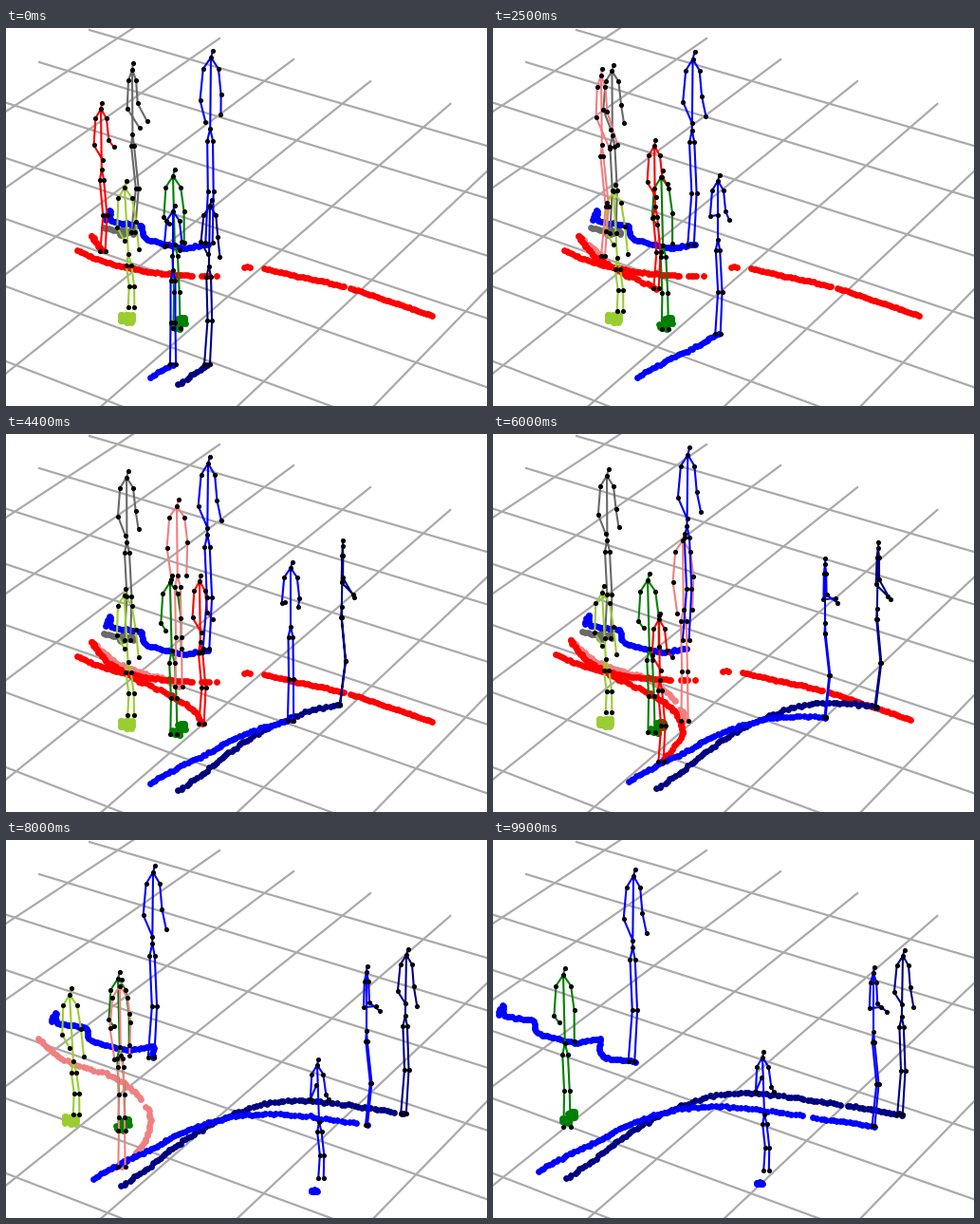
A matplotlib script for the animation above (10 s loop, 507x398 px).

```python
import numpy as np
import matplotlib.pyplot as plt
from matplotlib.animation import FuncAnimation

W, H = 507, 398
FRAMES, STEP = 100, 0.1
rng = np.random.default_rng(4)

fig = plt.figure(figsize=(W / 100, H / 100), dpi=100, facecolor="white")
ax = fig.add_axes([0, 0, 1, 1])
ax.set(xlim=(0, W), ylim=(H, 0))
ax.axis("off")

# The floor grid is two pencils of lines with vanishing points on one horizon.
LEFT, RIGHT = np.array([-3870, -1150]), np.array([1890, -1150])


def draw_grid(anchor, edge, away, step, count):
    """Lines leaving `away`, evenly spaced in perspective on the edge to `edge`."""
    arm = np.array(anchor) - edge
    for k in range(-1, count):
        start = edge + arm / (1 - k * step * arm[1])
        end = start + (start - away) * 0.6
        ax.plot(*zip(start, end), color="#aaaaaa", lw=1.6, zorder=1)


draw_grid((35, 36), RIGHT, LEFT, 2.48e-5, 7)
draw_grid((225, 11), LEFT, RIGHT, 1.61e-5, 8)


def glide(t, keys):
    """Smooth motion through (time, x, y) keys, resting outside them."""
    t = np.atleast_1d(t).astype(float)
    keys = np.array(keys, float)
    times, v = keys[:, 0], keys[:, 1:]
    if len(keys) == 1:
        return np.repeat(v, len(t), axis=0)
    m = np.gradient(v, times, axis=0)
    t = np.clip(t, times[0], times[-1])
    i = np.clip(np.searchsorted(times, t) - 1, 0, len(times) - 2)
    h = (times[i + 1] - times[i])[:, None]
    u = (t - times[i])[:, None] / h
    return ((2 * u**3 - 3 * u**2 + 1) * v[i] + (u**3 - 2 * u**2 + u) * h * m[i]
            + (3 * u**2 - 2 * u**3) * v[i + 1] + (u**3 - u**2) * h * m[i + 1])


def camera(t):
    times = [5.4, 6, 8, 9.9]
    return np.array([np.interp(t, times, [0, -9, -60, -104]),
                     np.interp(t, times, [0, -2, -11, -19])])


def dotted(*points, gap=2.6):
    """Evenly spaced dots along a polyline."""
    p = np.array(points, float)
    d = np.r_[0, np.cumsum(np.hypot(*np.diff(p, axis=0).T))]
    s = np.arange(0, d[-1], gap)
    dots = np.c_[np.interp(s, d, p[:, 0]), np.interp(s, d, p[:, 1])]
    return dots + rng.normal(0, .3, dots.shape)


def cloud(x, y, sx, sy, n=50):
    spread = np.clip(rng.normal(0, 1, (n, 2)), -1.5, 1.5)
    return spread * (sx, sy) + (x, y)


# One pen path over the joints; -1 lifts the pen.
PEN = [0, 1, 2, 3, 4, -1, 1, 5, 6, 7, -1, 1, 8, 9, 10, 11, -1, 8, 12, 13, 14]


def skeleton(feet, height, torso, lean, wrists, yaw):
    """Joints as (sideways, forward, down) in torso lengths, turned by yaw."""
    leg = height / torso

    def arm(side, elbow, wrist):
        return [(side * .11, 0, .16), (side * .15, 0, elbow), (side * .11, .2, wrist)]

    def limb(side):
        return [(side * .04, 0, 1.17), (side * .04, .08, (1.17 + leg) / 2),
                (side * .05, 0, leg)]

    body = np.array([(.03, 0, -.1), (0, 0, 0),
                     *arm(-1, .6, wrists[0]), *arm(1, .52, wrists[1]),
                     (0, 0, 1), *limb(-1), *limb(1)])
    side, ahead, down = body.T * torso
    x = side * np.cos(yaw) + ahead * np.sin(yaw) + lean * (down / height - 1)
    return np.c_[x, down - height] + feet


class Walker:
    def __init__(self, color, path, height, torso, lean=0, wrists=(.9, .8),
                 turn=((0, .3),), old=None, trail=True, start=None,
                 span=(0, 10), away=(0, 0), gap=(0, 0)):
        self.path, self.turn = path, np.array(turn, float).T
        self.shape = height, torso, lean, wrists
        self.span, self.away = span, away
        self.old = np.empty((0, 2)) if old is None else old
        first = path[0][0] if start is None else start
        ts = np.arange(first, 10, STEP) if trail else np.empty(0)
        self.times = ts[(ts < gap[0]) | (ts > gap[1])]
        self.dots = glide(self.times, path) + rng.normal(0, .5, (len(self.times), 2))
        self.trail, = ax.plot([], [], "o", ms=4.9, mew=0, color=color, zorder=2)
        self.bones, = ax.plot([], [], color=color, lw=1.5, zorder=3)
        self.joints, = ax.plot([], [], "o", ms=3.7, mew=0, color="black", zorder=4)
        self.parts = [self.trail, self.bones, self.joints]

    def update(self, t):
        now = t + .001
        seen = (self.span[0] <= now < self.span[1]
                and not self.away[0] <= now < self.away[1])
        for part in self.parts:
            part.set_visible(seen)
        shift = camera(t)
        dots = np.vstack([self.old, self.dots[self.times <= now]])
        # Far dots drift a little less than near ones.
        dots = dots + shift * (0.9 + 0.1 * dots[:, 1:] / 370)
        self.trail.set_data(*dots.T)
        yaw = np.interp(t, *self.turn)
        pts = skeleton(glide(t, self.path)[0], *self.shape, yaw) + shift
        self.joints.set_data(*pts.T)
        self.bones.set_data(*np.vstack([pts, [np.nan, np.nan]])[PEN].T)


red_line = dotted((75, 234), (105, 247), (150, 257), (196, 261), (222, 261),
                  (252, 251), (271, 253), (357, 272), (450, 303))
for a, b in ((197, 204), (215, 220), (224, 251), (258, 270), (358, 362)):
    red_line = red_line[(red_line[:, 0] < a) | (red_line[:, 0] > b)]

gray = Walker("dimgray", [(0, 134, 215), (1.5, 128, 216), (6, 130, 217)],
              171, 68, lean=1, turn=[(0, 1), (1.5, .4)], trail=False, span=(0, 7),
              old=np.vstack([dotted((103, 210), (115, 213), (134, 215)),
                             cloud(126, 215, 5, 2, 20)]))

lime = Walker("yellowgreen", [(0, 132, 294), (1.5, 134, 298), (6, 131, 295), (8, 134, 300)],
              126, 70, lean=7, wrists=(.8, .93), trail=False, span=(0, 9.2),
              old=cloud(127, 306, 4, 2.5))

green = Walker("green", [(0, 180, 316), (1.5, 182, 317), (6, 176, 316),
                         (8, 182, 317), (9.9, 182, 321)],
               160, 72, lean=4, wrists=(.7, .97), turn=[(0, .15)], trail=False,
               old=np.vstack([cloud(179, 314, 2.5, 2, 30), cloud(185, 308, 2.5, 2, 25)]))

salmon = Walker("lightcoral", [(1.4, 91, 219), (2.5, 116, 240), (4.4, 182, 266),
                               (6, 211, 304), (7, 204, 330), (8, 182, 355)],
                190, 73, lean=2, wrists=(1.05, 1), turn=[(1.5, 0), (2.5, 1), (4.4, .1)],
                span=(1.2, 8.3), gap=(5.25, 5.45))

red = Walker("red", [(-1, 90, 218), (0, 102, 235), (1.5, 141, 260), (2.5, 172, 274),
                     (4.4, 206, 305), (5.2, 207, 322), (6, 186, 347)],
             150, 64, lean=2, wrists=(.85, .63), turn=[(0, .6)],
             old=red_line, span=(0, 6.1))

navy = Walker("navy", [(-1.1, 182, 376), (0, 212, 354), (1.5, 251, 324), (4.4, 352, 285),
                       (6, 412, 289), (8, 479, 299), (9.9, 533, 308)],
              167, 64, lean=-3, wrists=(.8, .85),
              turn=[(0, .4), (1.5, 0), (4.4, 1.5), (6, 1.4), (8, .5)],
              away=(2.4, 3.1), gap=(7.7, 7.9))

tall = Walker("blue", [(0, 214, 226), (1.5, 209, 228), (4.4, 211, 226), (7.5, 213, 228),
                       (8, 213, 240), (9.9, 250, 252)],
              195, 75, lean=-2, turn=[(0, .2), (1.5, .5)], start=7.6,
              old=dotted((105, 202), (107, 196), (110, 192), (109, 199), (112, 204),
                         (143, 208), (144, 219), (150, 223), (186, 232), (215, 227)))

blue = Walker("blue", [(-.9, 152, 368), (0, 176, 354), (1.5, 215, 335), (2.5, 237, 322),
                       (4.4, 300, 302), (6, 359, 300), (8, 440, 311), (9.9, 505, 320)],
              161, 62, wrists=(.58, .66),
              turn=[(0, 0), (1.5, .7), (4.4, .1), (6, 1.4), (9.9, 1.1)], gap=(7.7, 7.9))

short = Walker("blue", [(8, 392, 367)], 119, 60, lean=4, wrists=(.35, .6),
               turn=[(0, .4)], trail=False, span=(7.9, 10),
               old=cloud(385, 380, 2, .5, 15))

walkers = [gray, lime, green, salmon, red, navy, tall, blue, short]


def draw(i):
    for w in walkers:
        w.update(i * STEP)
    return [part for w in walkers for part in w.parts]


anim = FuncAnimation(fig, draw, frames=FRAMES, interval=100, repeat=True,
                     repeat_delay=0, blit=False)
plt.show()
```
